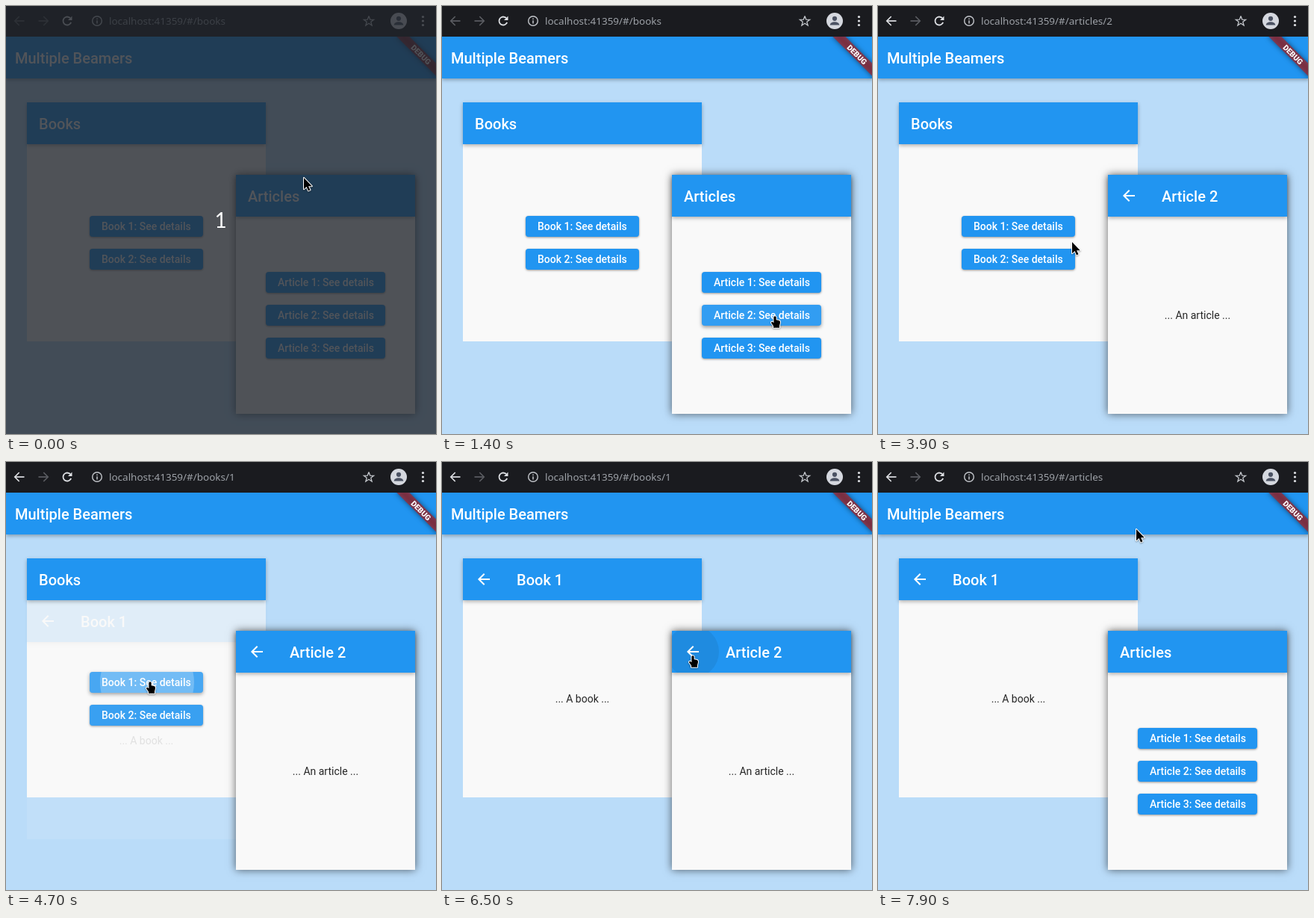
An HTML page with a canvas for the animation above (8 s loop, 576 by 573 pixels).

```html
<!DOCTYPE html>
<html lang="en">
<head>
<meta charset="utf-8">
<title>Multiple Beamers</title>
<style>
html, body { margin: 0; width: 100%; height: 100%; overflow: hidden; background: #badcf9; }
canvas { display: block; }
</style>
</head>
<body>
<canvas id="stage" width="576" height="573"></canvas>
<script>
const W = 576, H = 573, LOOP = 8000, STEP = 100;
const BLUE = '#2195f1', SKY = '#badcf9', PAPER = '#f9f9f9', CHROME = '#1a1b1f';
const ROBOTO = 'Roboto, sans-serif';
const screen = document.getElementById('stage').getContext('2d');
const layerCanvas = document.createElement('canvas');
layerCanvas.width = W;
layerCanvas.height = H;
const layer = layerCanvas.getContext('2d');

const books = { x: 28, y: 129, w: 320, h: 320 };
const articles = { x: 308, y: 226, w: 240, h: 320 };

// time, x, y, hand?
const pointer = [
  [0, 399, 230], [700, 406, 246], [800, 426, 291],
  [1000, 428, 298], [1100, 433, 325], [1200, 440, 364, 1], [1300, 444, 390], [1400, 446, 415, 1],
  [2800, 445, 415],
  [3300, 440, 411], [3400, 424, 402], [3500, 394, 386], [3600, 358, 368], [3700, 322, 350],
  [3800, 288, 332], [3900, 260, 316], [4000, 238, 303, 1], [4100, 224, 295, 1],
  [4400, 185, 294, 1], [4600, 193, 294, 1], [4900, 192, 295],
  [5600, 202, 291], [5700, 238, 279], [5800, 285, 266], [5900, 318, 258, 1], [6000, 330, 257, 1],
  [6300, 336, 259, 1], [6900, 335, 260],
  [7700, 337, 222], [7800, 342, 138], [7900, 346, 90]
];
const address = [[0, 'books'], [2300, 'articles/2'], [4600, 'books/1'], [6600, 'articles']];
// progress of each detail page, 0 hidden to 1 open
const articleOpen = [[0, 0], [2500, 0.8], [2800, 1], [6600, 0.95], [6700, 0.7], [6800, 0.45], [6900, 0]];
const bookOpen = [[0, 0], [4700, 0.275], [4800, 0.52], [4900, 1]];
const splashSize = [[0, 0], [4600, 18], [4700, 63], [4800, 120], [4900, 0]];

function at(list, t) {
  let hit = list[0];
  for (const row of list) if (row[0] <= t) hit = row;
  return hit;
}

function bezier(x1, y1, x2, y2) {
  const f = (a, b, s) => 3 * a * s * (1 - s) ** 2 + 3 * b * s * s * (1 - s) + s ** 3;
  return x => {
    let lo = 0, hi = 1;
    for (let i = 0; i < 24; i++) {
      const mid = (lo + hi) / 2;
      if (f(x1, x2, mid) < x) lo = mid; else hi = mid;
    }
    return f(y1, y2, lo);
  };
}
const slideCurve = bezier(0.4, 0, 0.2, 1);
const fadeCurve = bezier(0.42, 0, 1, 1);

function text(c, s, x, y, font, color, align = 'left') {
  c.font = font;
  c.fillStyle = color;
  c.textAlign = align;
  c.fillText(s, x, y);
}

function withShadow(c, color, blur, dy, draw) {
  c.save();
  c.shadowColor = color;
  c.shadowBlur = blur;
  c.shadowOffsetY = dy;
  draw();
  c.restore();
}

function bar(c, x, y, w) {
  withShadow(c, 'rgba(0,0,0,.3)', 5, 2, () => {
    c.fillStyle = BLUE;
    c.fillRect(x, y, w, 56);
  });
}

function title(c, s, x, y) {
  text(c, s, x, y, '500 20px ' + ROBOTO, '#fff');
}

function line(c, points, color, width) {
  c.beginPath();
  points.forEach(([x, y], i) => i ? c.lineTo(x, y) : c.moveTo(x, y));
  c.strokeStyle = color;
  c.lineWidth = width;
  c.stroke();
}

function disc(c, x, y, r, color) {
  c.beginPath();
  c.arc(x, y, r, 0, Math.PI * 2);
  c.fillStyle = color;
  c.fill();
}

function backIcon(c, x, y) {
  line(c, [[x + 8, y], [x - 6.5, y]], '#fff', 2);
  line(c, [[x + 0.7, y - 7.3], [x - 6.6, y], [x + 0.7, y + 7.3]], '#fff', 2);
}

function button(c, label, x, y, w, hover, splash) {
  c.beginPath();
  c.roundRect(x, y, w, 28, 4);
  withShadow(c, 'rgba(0,0,0,.4)', hover ? 5 : 3, hover ? 2 : 1, () => {
    c.fillStyle = BLUE;
    c.fill();
  });
  if (hover) {
    c.fillStyle = 'rgba(255,255,255,.08)';
    c.fill();
  }
  if (splash) {
    c.save();
    c.clip();
    disc(c, x + 77, y + 14, splash, 'rgba(255,255,255,.24)');
    c.restore();
  }
  text(c, label, x + 16, y + 19, '500 14px ' + ROBOTO, '#fff');
}

function sheet(c, box) {
  c.fillStyle = PAPER;
  c.fillRect(box.x, box.y, box.w, box.h);
  bar(c, box.x, box.y, box.w);
}

function listPage(c, box, name, count, top, inset, width, cursor, splash = 0) {
  sheet(c, box);
  title(c, name + 's', box.x + 16, box.y + 36);
  const [, cx, cy, hand] = cursor;
  for (let i = 0; i < count; i++) {
    const x = box.x + inset, y = top + i * 44;
    const hover = hand && cx > x && cx < x + width && cy >= y && cy < y + 28;
    button(c, `${name} ${i + 1}: See details`, x, y, width, hover, i ? 0 : splash);
  }
}

function detailPage(c, box, name, body, glow = 0) {
  sheet(c, box);
  if (glow) {
    c.save();
    c.beginPath();
    c.rect(box.x, box.y, box.w, 56);
    c.clip();
    disc(c, box.x + 28, box.y + 28, 35, `rgba(0,0,0,${glow})`);
    c.restore();
  }
  backIcon(c, box.x + 28, box.y + 28);
  title(c, name, box.x + 72, box.y + 36);
  text(c, body, box.x + box.w / 2, box.y + box.h / 2 + 33, '14px ' + ROBOTO, '#262626', 'center');
}

// New page rises a quarter of its height while it fades in
function reveal(c, box, p, draw) {
  if (p <= 0) return;
  layer.clearRect(0, 0, W, H);
  draw(layer);
  c.globalAlpha = fadeCurve(p);
  c.drawImage(layerCanvas, 0, Math.round((1 - slideCurve(p)) * box.h / 4));
  c.globalAlpha = 1;
}

function debugBanner(c) {
  c.save();
  c.beginPath();
  c.rect(0, 41, W, H);
  c.clip();
  c.translate(580, 41);
  c.rotate(Math.PI / 4);
  c.filter = 'blur(3.5px)';
  c.fillStyle = 'rgba(0,0,0,.5)';
  c.fillRect(-40, 28, 80, 12);
  c.filter = 'none';
  c.fillStyle = 'rgba(183,28,28,.63)';
  c.fillRect(-40, 28, 80, 12);
  text(c, 'DEBUG', 0, 37.7, '900 10.2px ' + ROBOTO, '#fff', 'center');
  c.restore();
}

function browserArrow(c, x, dir, color) {
  line(c, [[x - 6.5 * dir, 20], [x + 6 * dir, 20]], color, 1.7);
  line(c, [[x + 0.3 * dir, 14], [x + 6.2 * dir, 20], [x + 0.3 * dir, 26]], color, 1.7);
}

function browserBar(c, path, canGoBack) {
  const light = '#dfe1e5', dim = '#5b5d62', gray = '#9da1a7';
  c.fillStyle = CHROME;
  c.fillRect(0, 0, W, 41);
  browserArrow(c, 18, -1, canGoBack ? light : dim);
  browserArrow(c, 50, 1, dim);

  c.strokeStyle = light;
  c.lineWidth = 1.8;
  c.beginPath();
  c.arc(82, 20, 5.5, 0.35, Math.PI * 1.75);
  c.stroke();
  c.fillStyle = light;
  c.beginPath();
  c.moveTo(88.5, 13.5);
  c.lineTo(88.5, 19);
  c.lineTo(83, 19);
  c.fill();

  c.strokeStyle = '#c3c6cb';
  c.lineWidth = 1.4;
  c.beginPath();
  c.arc(122, 20, 6.3, 0, Math.PI * 2);
  c.stroke();
  line(c, [[122, 19.2], [122, 23.5]], '#c3c6cb', 1.5);
  line(c, [[122, 16.4], [122, 17.9]], '#c3c6cb', 1.5);
  text(c, 'localhost:41359/#/' + path, 138, 25, '13.47px "Noto Sans", sans-serif', gray);

  const star = [];
  for (let i = 0; i <= 10; i++) {
    const r = i % 2 ? 2.9 : 7, a = i * Math.PI / 5 - Math.PI / 2;
    star.push([486 + r * Math.cos(a), 20.4 + r * Math.sin(a)]);
  }
  line(c, star, '#c3c6cb', 1.3);

  disc(c, 526, 20, 11, '#d5d8df');
  disc(c, 526, 16.8, 3.1, '#4b5263');
  c.beginPath();
  c.ellipse(526, 25.5, 6.3, 4.2, 0, Math.PI, 0);
  c.fill();
  for (const y of [14.5, 20, 25.5]) disc(c, 558.5, y, 1.6, light);
}

const arrowShape = new Path2D('M0 0V15.2L3.6 12L6 17.4L8.5 16.3L6.1 11.2H10.8Z');
const handShape = new Path2D('M-1.6 1.5Q0 -1 1.6 1.5V5.2L5.5 6Q7.2 6.6 7 9L6 13V15.8H-2V13.4L-5 9.2Q-4.8 7 -3 8L-1.6 9.2Z');

function drawPointer(c, [, x, y, hand]) {
  const shape = hand ? handShape : arrowShape;
  c.save();
  c.translate(x, y);
  c.lineJoin = 'round';
  c.strokeStyle = '#fff';
  c.lineWidth = 2;
  withShadow(c, 'rgba(0,0,0,.35)', 2, 1, () => c.stroke(shape));
  c.fillStyle = '#000';
  c.fill(shape);
  c.restore();
}

function draw(t) {
  const c = screen;
  const cursor = at(pointer, t);
  c.fillStyle = SKY;
  c.fillRect(0, 0, W, H);
  bar(c, 0, 41, W);
  title(c, 'Multiple Beamers', 12, 77);
  browserBar(c, at(address, t)[1], t >= 2300);

  const bookShown = at(bookOpen, t)[1];
  if (bookShown < 1) listPage(c, books, 'Book', 2, 281, 84, 152, cursor, at(splashSize, t)[1]);
  reveal(c, books, bookShown, l => detailPage(l, books, 'Book 1', '... A book ...'));

  withShadow(c, 'rgba(0,0,0,.6)', 11, 0, () => {
    c.fillStyle = PAPER;
    c.fillRect(articles.x, articles.y, articles.w, articles.h);
  });
  const articleShown = at(articleOpen, t)[1];
  const glow = t >= 6500 ? 0.07 : t >= 5900 ? 0.05 : 0;
  if (articleShown < 1) listPage(c, articles, 'Article', 3, 356, 40, 160, cursor);
  reveal(c, articles, articleShown, l => detailPage(l, articles, 'Article 2', '... An article ...', glow));

  debugBanner(c);
  if (t < 200) {
    c.fillStyle = 'rgba(33,37,43,.78)';
    c.fillRect(0, 0, W, H);
    text(c, '1', 287.5, 297, '28px Lato, sans-serif', '#fff', 'center');
  }
  drawPointer(c, cursor);
}

function tick() {
  const t = performance.now() % LOOP;
  draw(Math.floor(t / STEP) * STEP);
  requestAnimationFrame(tick);
}
tick();
</script>
</body>
</html>
```
